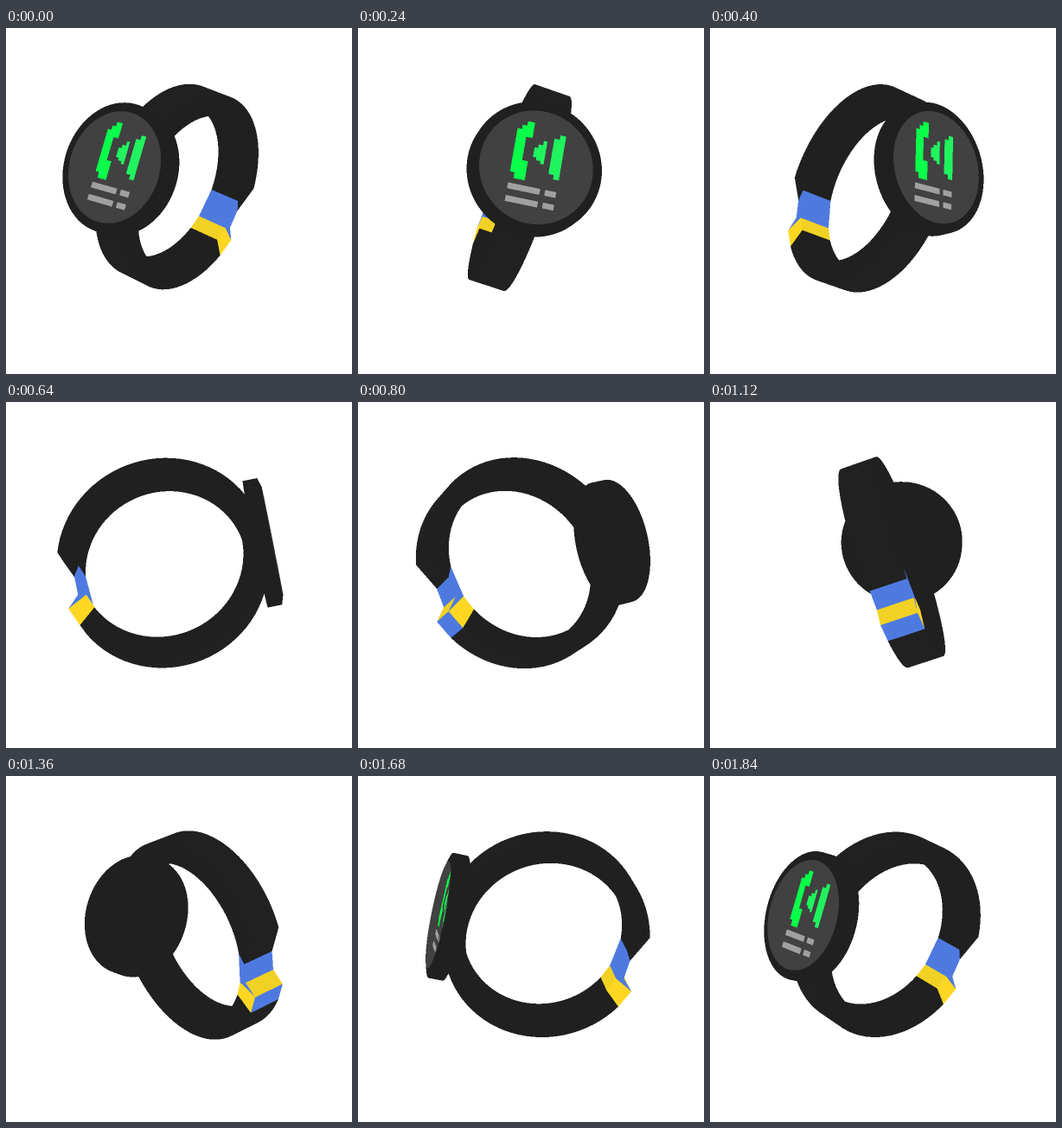
An HTML page with a canvas that plays this animation: 400x400 px, repeating every 1920 ms.

```html
<!DOCTYPE html>
<html lang="en">
<head>
<meta charset="utf-8">
<title>Spinning smartwatch</title>
<style>
  html, body { margin: 0; width: 100%; height: 100%; overflow: hidden; background: #fff; }
  canvas { display: block; width: 400px; height: 400px; }
</style>
</head>
<body>
<canvas id="stage" width="800" height="800"></canvas>
<script>
const SIZE = 800, UNIT = 2;            // drawn at double size for smooth edges
const STEP = 80, STEPS = 24;
const CAMERA = 1700, PITCH = 1.5, ELEVATION = 11.3, START = -34, AXIS = 200.8;
const STRAP_ROLL = 19, FACE_ROLL = 12;
const OUTER = 119.8, INNER = 94.5, HALF_WIDTH = 21.2;

const BLACK = [32, 32, 32], STRAP = [33, 33, 33], GLASS = [65, 65, 65];
const GREY = [160, 159, 162], GREEN = [10, 255, 74], WAVE = [32, 243, 94];
const BLUE = [78, 122, 224], YELLOW = [255, 215, 34], GOLD = [241, 209, 36];

const ctx = document.getElementById('stage').getContext('2d');
const image = ctx.createImageData(SIZE, SIZE);
const pixels = new Uint32Array(image.data.buffer);
const depth = new Float32Array(SIZE * SIZE);

const rad = deg => deg * Math.PI / 180;
const sin = deg => Math.sin(rad(deg)), cos = deg => Math.cos(rad(deg));
const add = (...vs) => [0, 1, 2].map(i => vs.reduce((sum, v) => sum + v[i], 0));
const mul = (v, k) => v.map(c => c * k);
const polar = (r, deg) => [r * cos(deg), r * sin(deg)];

function project([x, y, z]) {
  const s = CAMERA / (CAMERA - z * cos(PITCH) - y * sin(PITCH));
  const up = y * cos(PITCH) - z * sin(PITCH);
  return [UNIT * (AXIS + x * s), UNIT * (200 - up * s), s];
}

function triangle(a, b, c, ink) {
  const area = (b[0] - a[0]) * (c[1] - a[1]) - (b[1] - a[1]) * (c[0] - a[0]);
  if (Math.abs(area) < 1e-6) return;
  const xs = [a[0], b[0], c[0]], ys = [a[1], b[1], c[1]];
  const x0 = Math.max(0, Math.floor(Math.min(...xs))), x1 = Math.min(SIZE - 1, Math.ceil(Math.max(...xs)));
  const y0 = Math.max(0, Math.floor(Math.min(...ys))), y1 = Math.min(SIZE - 1, Math.ceil(Math.max(...ys)));
  for (let y = y0; y <= y1; y++) {
    for (let x = x0; x <= x1; x++) {
      const px = x + 0.5, py = y + 0.5;
      const v = ((px - a[0]) * (c[1] - a[1]) - (py - a[1]) * (c[0] - a[0])) / area;
      const w = ((b[0] - a[0]) * (py - a[1]) - (b[1] - a[1]) * (px - a[0])) / area;
      if (v < 0 || w < 0 || v + w > 1) continue;
      const near = a[2] + v * (b[2] - a[2]) + w * (c[2] - a[2]);
      const i = y * SIZE + x;
      if (near > depth[i]) {
        depth[i] = near;
        pixels[i] = ink;
      }
    }
  }
}

function polygon(points, [r, g, b]) {
  const ink = (255 << 24 | b << 16 | g << 8 | r) >>> 0;
  const p = points.map(project);
  for (let i = 2; i < p.length; i++) triangle(p[0], p[i - 1], p[i], ink);
}

// Joins two outlines of equal length with a band of quads.
function band(a, b, colour) {
  a.forEach((p, i) => {
    const j = (i + 1) % a.length;
    polygon([p, a[j], b[j], b[i]], colour);
  });
}

// Extrudes a flat outline across the strap; walls holds one colour per edge.
function prism(outline, place, cap, walls) {
  const left = outline.map(p => place(p, -HALF_WIDTH));
  const right = outline.map(p => place(p, HALF_WIDTH));
  polygon(left, cap);
  polygon(right, cap);
  walls.forEach((colour, i) => {
    const j = (i + 1) % outline.length;
    if (colour) polygon([left[i], left[j], right[j], right[i]], colour);
  });
}

function drawStrap(place) {
  const parts = 72;
  const at = k => [polar(INNER, -152 + 327 * k / parts), polar(OUTER, -149 + 315 * k / parts)];
  for (let k = 0; k < parts; k++) {
    const [in0, out0] = at(k), [in1, out1] = at(k + 1);
    prism([in0, out0, out1, in1], place, BLACK, [k ? null : BLACK, STRAP, null, BLACK]);
  }
  const [tipIn, tipOut] = at(parts);
  const tip = polar(101, 181.8), neck = polar(103, 194.5);
  const topIn = polar(INNER, 197), topOut = polar(OUTER, 199.5);
  const endIn = polar(INNER, 208), endOut = polar(OUTER, 211);
  prism([tipIn, tipOut, tip], place, BLACK, [null, STRAP, BLACK]);
  prism([tip, tipIn, topIn, neck], place, BLUE, [null, BLUE, null, BLUE]);
  prism([neck, topIn, topOut], place, BLUE, [null, null, GOLD]);
  prism([topIn, topOut, endOut, endIn], place, YELLOW, [null, BLUE, null, GOLD]);
}

function drawCase(place) {
  const circle = (r, lift) => Array.from({ length: 72 }, (_, i) => place(...polar(r, i * 5), lift));
  const back = circle(73.5, -10), edge = circle(73.5, 6.5), rim = circle(62.8, 9.8);
  const floor = circle(62.5, 4);
  polygon(back, BLACK);
  band(back, edge, BLACK);
  band(edge, rim, BLACK);
  // the screen lies sunk below the rim
  band(rim, floor, GLASS);
  polygon(floor, GLASS);

  const block = (x0, x1, y0, y1, colour) =>
    polygon([[x0, y0], [x1, y0], [x1, y1], [x0, y1]].map(([x, y]) => place(x, 0.6 - y, 4.5)), colour);
  // handset
  block(-27, -22, -39, 10, GREEN);
  block(-22, -16, -44, 16.5, GREEN);
  block(-17, -9, -49, -31.5, GREEN);
  block(-16, -9.5, -5, 16.5, GREEN);
  // sound waves
  block(-5, -1, -22, -11, WAVE);
  block(-1, 4, -26, -8, WAVE);
  block(4, 8, -31, -5, WAVE);
  block(15, 21, -36, 4, WAVE);
  block(21, 27.5, -41, 9, WAVE);
  // caption bars
  for (const y of [22.3, 36.5]) {
    block(-27, 9, y, y + 6.6, GREY);
    block(14.5, 27, y, y + 6.4, GREY);
  }
}

function draw(step) {
  pixels.fill(0xffffffff);
  depth.fill(0);
  const turn = START + step * 360 / STEPS;
  const ahead = [sin(turn), 0, cos(turn)], side = [cos(turn), 0, -sin(turn)], rise = [0, 1, 0];
  const normal = add(mul(ahead, cos(ELEVATION)), mul(rise, sin(ELEVATION)));
  const upright = add(mul(ahead, -sin(ELEVATION)), mul(rise, cos(ELEVATION)));
  const rolled = deg => [
    add(mul(side, cos(deg)), mul(upright, -sin(deg))),
    add(mul(side, sin(deg)), mul(upright, cos(deg)))
  ];
  const spot = (a, s, r) => add(mul(ahead, a), mul(side, s), mul(rise, r));

  const [across, up] = rolled(STRAP_ROLL), hub = spot(-18.4, -12, 15.2);
  drawStrap(([p, q], w) => add(hub, mul(normal, p), mul(up, q), mul(across, w)));

  const [faceX, faceY] = rolled(FACE_ROLL), middle = spot(97.4, -15.5, 37.6);
  drawCase((x, y, lift) => add(middle, mul(faceX, x), mul(faceY, y), mul(normal, lift)));

  ctx.putImageData(image, 0, 0);
}

let shown = -1;
const began = performance.now();
function tick() {
  const step = Math.floor((performance.now() - began) / STEP) % STEPS;
  if (step !== shown) draw(shown = step);
  requestAnimationFrame(tick);
}
tick();
</script>
</body>
</html>
```
